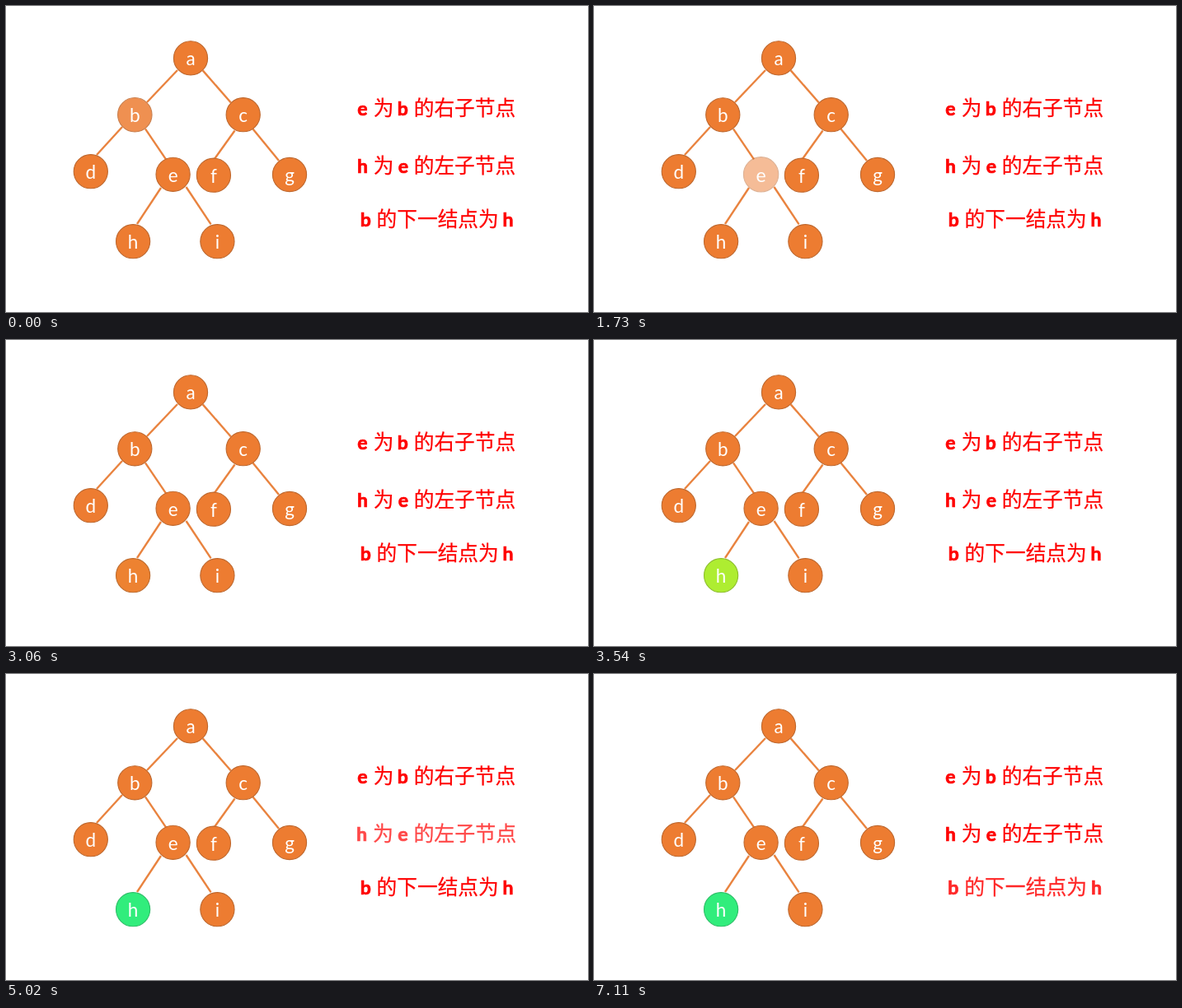
These frames come from a looping animation (706 px wide and 372 px high, 7.19 s). An HTML page:

```html
<!DOCTYPE html>
<html lang="zh">
<head>
<meta charset="utf-8">
<title>Binary tree: next node in order</title>
<style>
  html, body { margin: 0; width: 100%; height: 100%; overflow: hidden; background: #fff; }
  svg { display: block; width: 706px; height: 372px; }
  .edge { stroke: #e9833f; stroke-width: 2.4; }
  .node { --hue: 24; }
  .node circle { fill: hsl(var(--hue) 84% 56%); stroke: hsl(var(--hue) 62% 46%); stroke-width: 1.1; }
  .node text { font: 400 22.5px Lato, sans-serif; fill: #fff; text-anchor: middle; }
  .note { fill: #f00; stroke: #f00; }
  .latin { font: 700 23px Lato, sans-serif; stroke-width: .7; }
  .han { font: 400 24.7px "Noto Sans CJK SC", "Noto Sans CJK", sans-serif; stroke-width: .25; }
</style>
</head>
<body>
<svg id="stage" viewBox="0 0 706 372">
  <g id="edges"></g>
  <g id="nodes"></g>
  <g class="note" id="note1">
    <text class="latin" x="426.3" y="132.5">e</text>
    <text class="han" x="445.8" y="133.2">为</text>
    <text class="latin" x="474.8" y="132.5">b</text>
    <text class="han" x="494.7" y="133.2">的右子节点</text>
  </g>
  <g class="note" id="note2">
    <text class="latin" x="426" y="202.5">h</text>
    <text class="han" x="445.8" y="203.2">为</text>
    <text class="latin" x="475.8" y="202.5">e</text>
    <text class="han" x="494.7" y="203.2">的左子节点</text>
  </g>
  <g class="note" id="note3">
    <text class="latin" x="429.8" y="267.5">b</text>
    <text class="han" x="449.6" y="268.2">的下一结点为</text>
    <text class="latin" x="602.5" y="267.5">h</text>
  </g>
</svg>
<script>
  const LOOP = 7190;

  const nodes = {
    a: [224, 63.4], b: [156.3, 132.3], c: [287.7, 132.2],
    d: [102.8, 201.2], e: [202.6, 204.8], f: [251.9, 205.7],
    g: [344, 205], h: [154.1, 286.2], i: [256.4, 286.2]
  };
  const edges = [
    [208, 78, 171, 117], [238.7, 78.4, 272.8, 117.5],
    [141, 147, 110, 181], [169, 149.4, 194, 186.4],
    [277.5, 151.5, 252.5, 186.5], [299.3, 149.3, 331, 188],
    [188, 221, 159, 265], [218.5, 220, 248.6, 265.4]
  ];

  const byId = id => document.getElementById(id);

  function add(parent, tag, attrs, text = '') {
    const el = document.createElementNS('http://www.w3.org/2000/svg', tag);
    for (const key in attrs) el.setAttribute(key, attrs[key]);
    el.textContent = text;
    return parent.appendChild(el);
  }

  for (const [x1, y1, x2, y2] of edges) {
    add(byId('edges'), 'line', { class: 'edge', x1, y1, x2, y2 });
  }
  for (const name in nodes) {
    const [cx, cy] = nodes[name];
    const group = add(byId('nodes'), 'g', { class: 'node', id: name });
    add(group, 'circle', { cx, cy, r: 20.6 });
    add(group, 'text', { x: cx, y: cy + 9 }, name);
  }

  // Each item may pulse several times: [start, duration]
  const pulses = [
    { el: byId('b'), at: nodes.b, runs: [[-65, 1040], [5125, 1030]] },
    { el: byId('e'), at: nodes.e, runs: [[972, 1040]] },
    { el: byId('note1'), at: [522, 124], runs: [[1985, 1040]] },
    { el: byId('note2'), at: [522, 194], runs: [[4080, 1060]] },
    { el: byId('note3'), at: [523, 258.7], runs: [[6117, 1060]] }
  ];
  const sweep = { start: 3045, length: 1060, from: 24, turn: 120 };

  const clamp = v => Math.min(1, Math.max(0, v));

  // Fades to half and back at the ends, swelling by 5% in the middle
  function pulse({ el, at: [x, y], runs }, t) {
    let edge = 0;
    for (const [start, length] of runs) {
      const p = clamp((t - start) / length);
      edge = Math.max(edge, Math.min(p, 1 - p));
    }
    const scale = 1 + 0.1 * edge;
    el.setAttribute('opacity', 1 - 0.5 * Math.min(1, edge / 0.2));
    el.setAttribute('transform',
      `translate(${x} ${y}) scale(${scale}) translate(${-x} ${-y})`);
  }

  function draw(t) {
    for (const item of pulses) pulse(item, t);
    const p = clamp((t - sweep.start) / sweep.length);
    byId('h').style.setProperty('--hue', sweep.from + sweep.turn * p);
  }

  const begin = performance.now();
  function loop() {
    draw((performance.now() - begin) % LOOP);
    requestAnimationFrame(loop);
  }
  loop();
</script>
</body>
</html>
```
